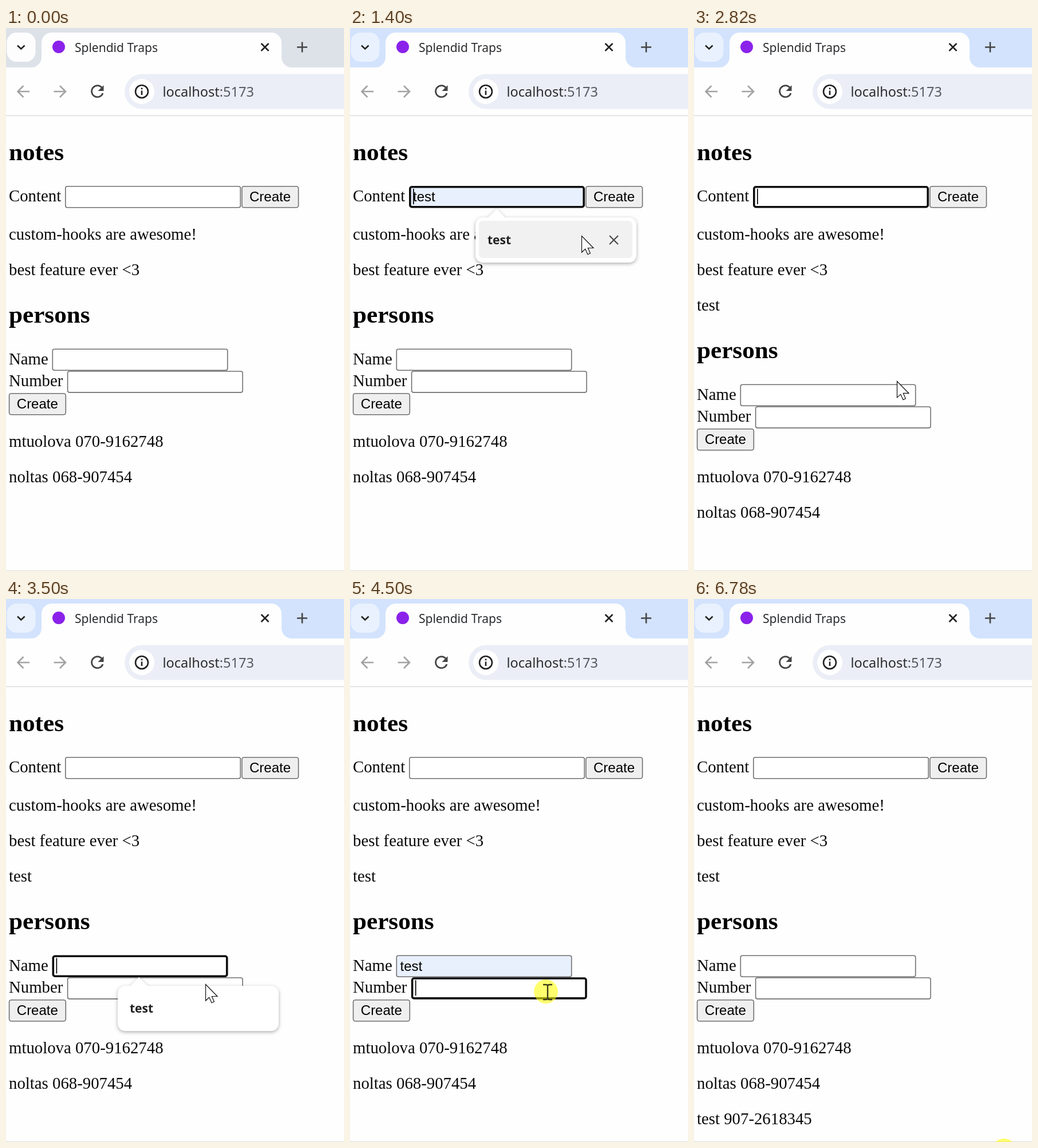
Animation of 590x949 px, one loop 6850 ms. Source, as an HTML page:

```html
<!DOCTYPE html>
<html lang="en">
<head>
<meta charset="utf-8">
<title>Notes and persons</title>
<style>
  html, body { margin: 0; width: 100%; height: 100%; overflow: hidden; background: #fefefe; }
  svg { display: block; }
  text { white-space: pre; }
  .ui { font-family: "Noto Sans", "Open Sans", sans-serif; fill: #2a2c2f; }
  .body { font: 28.8px "Liberation Serif", "Times New Roman", serif; fill: #0a0a0a; }
  .head { font: bold 43.2px "Liberation Serif", "Times New Roman", serif; }
  .form { font: 24px "Liberation Sans", Arial, sans-serif; }
  .item { font-size: 21px; font-weight: 600; fill: #222; }
  .line { fill: none; stroke: #222; stroke-width: 2.6; }
  .popup { filter: drop-shadow(0 2px 3px rgba(0, 0, 0, .32)); }
</style>
</head>
<body>
<svg width="590" height="949" viewBox="0 0 590 949">
  <rect width="590" height="949" fill="#fefefe"/>

  <!-- tab strip -->
  <path id="strip" d="M0 0H590V69H499A18 18 0 0 1 481 51V26A18 18 0 0 0 463 8H80A18 18 0 0 0 62 26V51A18 18 0 0 1 44 69H0Z"/>
  <rect id="search" x="1.5" y="8" width="50" height="51" rx="17"/>
  <path class="line" stroke-width="3" d="M20 30.5L26.3 36.5L32.6 30.5"/>
  <circle cx="92" cy="33" r="11" fill="#8a22ea"/>
  <text class="ui" x="120" y="42" font-size="21">Splendid Traps</text>
  <path class="line" d="M445.5 27L458.5 40M458.5 27L445.5 40"/>
  <path class="line" style="stroke:#444" d="M508 33.5H526M517 24.5V42.5"/>

  <!-- toolbar -->
  <g class="line" style="stroke:#a2a2a2">
    <path d="M41 111H21M30.5 101L20.5 111L30.5 121"/>
    <path d="M83.5 111H104M94 101L104 111L94 121"/>
  </g>
  <path class="line" style="stroke:#444;stroke-width:2.8" d="M167.5 104.5A10 10 0 1 0 169 114"/>
  <path fill="#444" d="M170.5 100V110H160.5Z"/>
  <path fill="#ebeef6" d="M590 80.5H237.5A30.5 30.5 0 0 0 237.5 141.5H590Z"/>
  <circle cx="237" cy="111" r="22" fill="#fff"/>
  <circle class="line" cx="237" cy="111" r="11"/>
  <path class="line" d="M237 109.5V117M237 104.5V107.3"/>
  <text class="ui" x="273.5" y="120" font-size="23.5">localhost<tspan fill="#55585d">:5173</tspan></text>
  <rect y="152.5" width="590" height="1.5" fill="#dcdddf"/>

  <g id="page"></g>
  <rect y="948" width="590" height="1" fill="#dadada"/>
  <g id="pointer"></g>
</svg>

<script>
const LOOP = 6850, STEP = 67.1, PITCH = 62;
const NUMBER = '907-2618345';
const $ = id => document.getElementById(id);

// Pointer legs: start, end, from x, y, to x, y, shape, halo
const legs = [
  [70, 740, 541, 936, 420, 299, 'arrow', true],
  [740, 1000, 420, 299, 392, 297, 'beam', true],
  [1130, 1400, 392, 297, 404, 363, 'arrow', false],
  [2550, 2820, 404, 363, 354, 617, 'arrow', false],
  [3020, 3160, 354, 635, 354, 642, 'beam', true],
  [3290, 3500, 353, 646, 348, 673, 'arrow', false],
  [3500, 3770, 348, 673, 345, 712, 'arrow', false],
  [4030, 4440, 346, 712, 345, 687, 'beam', true],
  [4700, 5000, 345, 690, 342, 746, 'arrow', false],
  [6160, 6510, 342, 746, 506, 952, 'arrow', false],
  [6700, 6850, 541, 964, 541, 964, 'arrow', true]
];

// Suggestion popups: open, hover, close, x, y, text
const popups = [
  [930, 1330, 1730, 219, 331, 'test'],
  [3220, 3630, 3960, 195, 676, 'test'],
  [4630, 4830, 5180, 222, 715, NUMBER]
];

const within = (t, a, b) => t >= a && t < b;
const text = (kind, x, y, s) =>
  `<text class="${kind}" x="${x}" y="${y}">${s.replace('<', '&lt;')}</text>`;
const rect = (x, y, w, h, r, fill) =>
  `<rect x="${x}" y="${y}" width="${w}" height="${h}" rx="${r}" fill="${fill}"/>`;

// Box given by its outer edge, with the border drawn inside
const box = (x, y, w, h, r, border, color, fill) =>
  rect(x, y, w, h, r, color) +
  rect(x + border, y + border, w - 2 * border, h - 2 * border, Math.max(1, r - border), fill);

function field(x, y, value, focused, caretAtEnd) {
  const fill = value ? '#e8f0fe' : '#fff';
  let out = focused
    ? box(x, y, 307, 38.5, 5, 3.6, '#0c0c0c', fill)
    : box(x, y, 307, 38.5, 4, 1.6, '#6f6f6f', fill);
  out += text('form', x + 7, y + 27, value);
  if (focused) {
    const width = value === NUMBER ? 141 : 39;
    out += rect(x + 7 + (caretAtEnd && value ? width : 0), y + 5, 1.7, 27, 0, '#000');
  }
  return out;
}

const button = (x, y) =>
  box(x, y, 100.3, 38.5, 4.5, 1.6, '#6f6f6f', '#efefef') + text('form', x + 14, y + 27, 'Create');

function popup([open, hover, close, x, y, label], t) {
  if (!within(t, open, close)) return '';
  const over = t >= hover;
  const cross = `M${x + 234} ${y + 32}l15 15m0-15l-15 15`;
  return `<g class="popup">${rect(x, y, 281, 79, 13, '#fff')}
    <path fill="#fff" d="M${x + 21} ${y + 1}L${x + 37} ${y - 15}L${x + 53} ${y + 1}Z"/></g>` +
    (over ? rect(x + 6, y + 6, 268, 65, 7, '#f1f1f1') +
      `<path class="line" style="stroke:#444;stroke-width:2" d="${cross}"/>` : '') +
    text('ui item', x + 21, y + 47, label);
}

function drawPage(t) {
  const dy = t >= 2010 ? PITCH : 0;
  const note = within(t, 1330, 2010) ? 'test' : '';
  const name = within(t, 3630, 5570) ? 'test' : '';
  const number = within(t, 4830, 5570) ? NUMBER : '';
  const notes = ['custom-hooks are awesome!', 'best feature ever <3'];
  const people = ['mtuolova 070-9162748', 'noltas 068-907454'];
  if (dy) notes.push('test');
  if (t >= 5570) people.push('test ' + NUMBER);

  $('page').innerHTML =
    text('head', 5, 231, 'notes') +
    text('body', 5, 303, 'Content') +
    field(103, 276, note, within(t, 870, 3090), t >= 1730) +
    button(411, 276) +
    notes.map((s, i) => text('body', 5, 370 + i * PITCH, s)).join('') +
    text('head', 5, 515 + dy, 'persons') +
    text('body', 5, 588 + dy, 'Name') +
    field(80.5, 560.5 + dy, name, within(t, 3090, 4500), t >= 3960) +
    text('body', 5, 626 + dy, 'Number') +
    field(106.8, 599.2 + dy, number, within(t, 4500, 6710), t >= 5180) +
    button(4.8, 638 + dy) +
    people.map((s, i) => text('body', 5, 732 + dy + i * PITCH, s)).join('') +
    popups.map(p => popup(p, t)).join('');
}

const shapes = {
  arrow: '<path fill="#fff" stroke="#111" stroke-width="1.2" d="M.5 .5V29L6.7 23.2L11 32.7L15.4 30.8L11.3 21.5H21Z"/>',
  beam: '<path fill="none" stroke="#3c3c1c" stroke-width="2.4" d="M-8-13H-3Q0-13 0-10Q0-13 3-13H8M0-11V11M-8 13H-3Q0 13 0 10Q0 13 3 13H8"/>'
};

function drawPointer(t) {
  const leg = legs.filter(l => t >= l[0]).pop();
  if (!leg) return $('pointer').innerHTML = '';
  const [start, end, x0, y0, x1, y1, shape, halo] = leg;
  const stepped = Math.floor(t / STEP + .15) * STEP;
  const p = Math.min(1, Math.max(0, (stepped - start) / (end - start)));
  const k = p * p * (3 - 2 * p);
  const x = x0 + (x1 - x0) * k, y = y0 + (y1 - y0) * k;
  const dx = shape === 'beam' ? -3 : 0;
  $('pointer').innerHTML = `<g transform="translate(${x} ${y})">` +
    (halo ? `<circle cx="${dx}" cy="${dx / 3}" r="21" fill="#ffff00" opacity=".57"/>` : '') +
    shapes[shape] + '</g>';
}

function draw(now) {
  const t = now % LOOP;
  const active = t >= 870;
  $('strip').setAttribute('fill', active ? '#d3e3fd' : '#dde2e9');
  $('search').setAttribute('fill', active ? '#e9f1fe' : '#fdfdfe');
  drawPage(t);
  drawPointer(t);
}

const origin = performance.now();
function tick() {
  draw(performance.now() - origin);
  requestAnimationFrame(tick);
}
tick();
</script>
</body>
</html>
```
